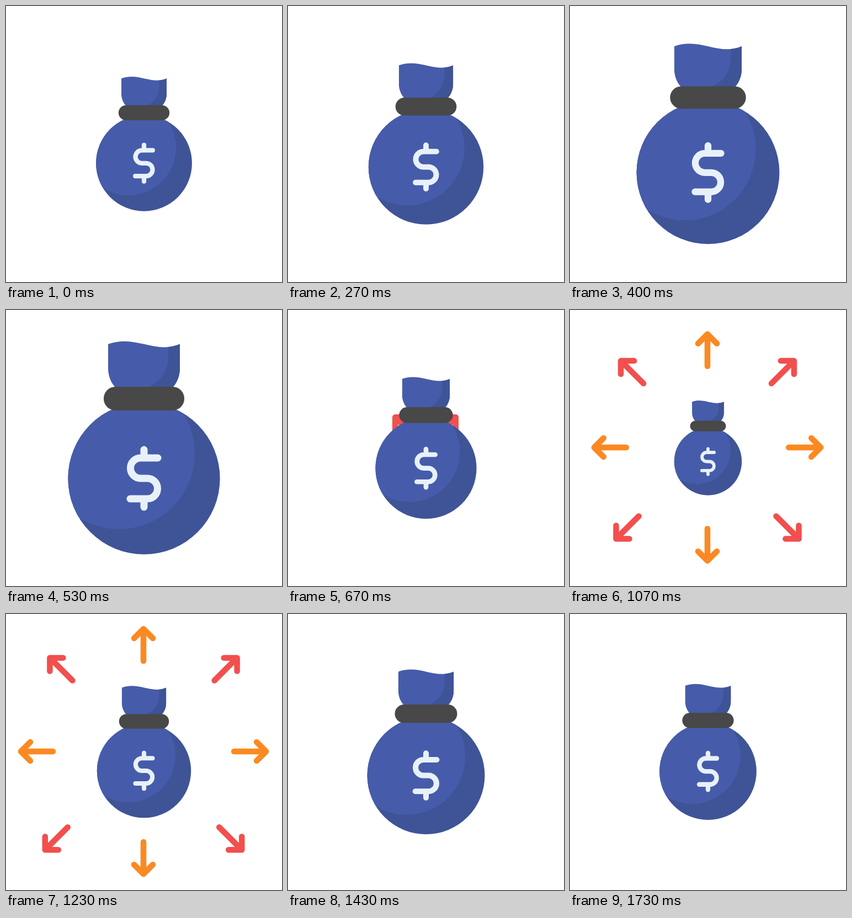
An HTML page that plays this animation: 500 px wide and 500 px high, repeating every 1760 ms.

```html
<!DOCTYPE html>
<html lang="en">
<head>
<meta charset="utf-8">
<title>Money bag</title>
<style>
  html, body { margin: 0; width: 100%; height: 100%; overflow: hidden; background: #fff; }
  svg { display: block; width: 100%; height: 100%; }
  .line { fill: none; stroke-linecap: round; stroke-linejoin: round; }
</style>
</head>
<body>
<svg viewBox="-250 -250 500 500">
  <defs>
    <clipPath id="body"><circle cy="55" r="137.5"/></clipPath>
    <clipPath id="neck">
      <path d="M-65-188C-15-206 20-169 65-188V-145C65-131 60-119 53-111L45-100H-45L-53-111C-60-119-65-131-65-145Z"/>
    </clipPath>
    <path id="arrow" class="line" stroke-width="10.5" d="M-30 0H28M11-17L28 0L11 17"/>
  </defs>
  <g id="arrows" transform="translate(-1 -1)"></g>
  <g id="bag">
    <g clip-path="url(#neck)">
      <rect x="-70" y="-200" width="140" height="105" fill="#465caa"/>
      <path fill="#3f5397" d="M44-200V-165C44-140 30-120 9-111V-95H70V-200Z"/>
    </g>
    <g clip-path="url(#body)">
      <circle cy="55" r="140" fill="#3f5397"/>
      <circle cx="-45" cy="10" r="137" fill="#465caa"/>
    </g>
    <rect x="-73" y="-111" width="146" height="43" rx="21.5" fill="#484848"/>
    <path class="line" stroke="#e8f1f9" stroke-width="13"
      d="M25 18H-6A18.5 18.5 0 0 0-6 55H6A18.5 18.5 0 0 1 6 92H-25M0 3V18M0 92V107"/>
  </g>
</svg>
<script>
const LOOP = 1760;
const bag = document.getElementById('bag');
const layer = document.getElementById('arrows');

const clamp = p => Math.max(0, Math.min(1, p));
const ease = p => p * p * (3 - 2 * p);
const span = (frame, start, end) => clamp((frame - start) / (end - start));

// Eight arrows; the diagonal ones start further out, more so below the bag
const arrows = Array.from({ length: 8 }, (_, i) => {
  const angle = i * 45;
  const diagonal = i % 2 > 0;
  const node = document.createElementNS('http://www.w3.org/2000/svg', 'use');
  node.setAttribute('href', '#arrow');
  node.setAttribute('stroke', diagonal ? '#f24f4d' : '#fb8921');
  layer.append(node);
  const rest = diagonal ? 11 + 8.6 * Math.sin(angle * Math.PI / 180) : 0;
  return { node, angle, rest, reach: diagonal ? 209 : 196 };
});

// Half the bag's height: swell, shrink, swell again, settle
const bagHeight = frame => 122
  + 75 * ease(span(frame, 0, 15) ** 1.54)
  - 137 * ease(span(frame, 15, 25))
  + 92 * ease(span(frame, 25, 45))
  - 30 * ease(span(frame, 45, 53));

// Arrows fly out, then return behind the bag
const spread = frame => ease(Math.min(span(frame, 13, 36.5), span(frame, 45, 36.5)));

function draw(now) {
  // 30 steps a second, with starts rounded to 10 ms
  const frame = Math.min(52, Math.floor((now % LOOP + 7) * 0.03));
  const out = spread(frame);
  bag.setAttribute('transform', `scale(${bagHeight(frame) / 193})`);
  for (const { node, angle, rest, reach } of arrows) {
    node.setAttribute('transform', `rotate(${angle}) translate(${rest + reach * out})`);
  }
  requestAnimationFrame(draw);
}
draw(performance.now());
</script>
</body>
</html>
```
